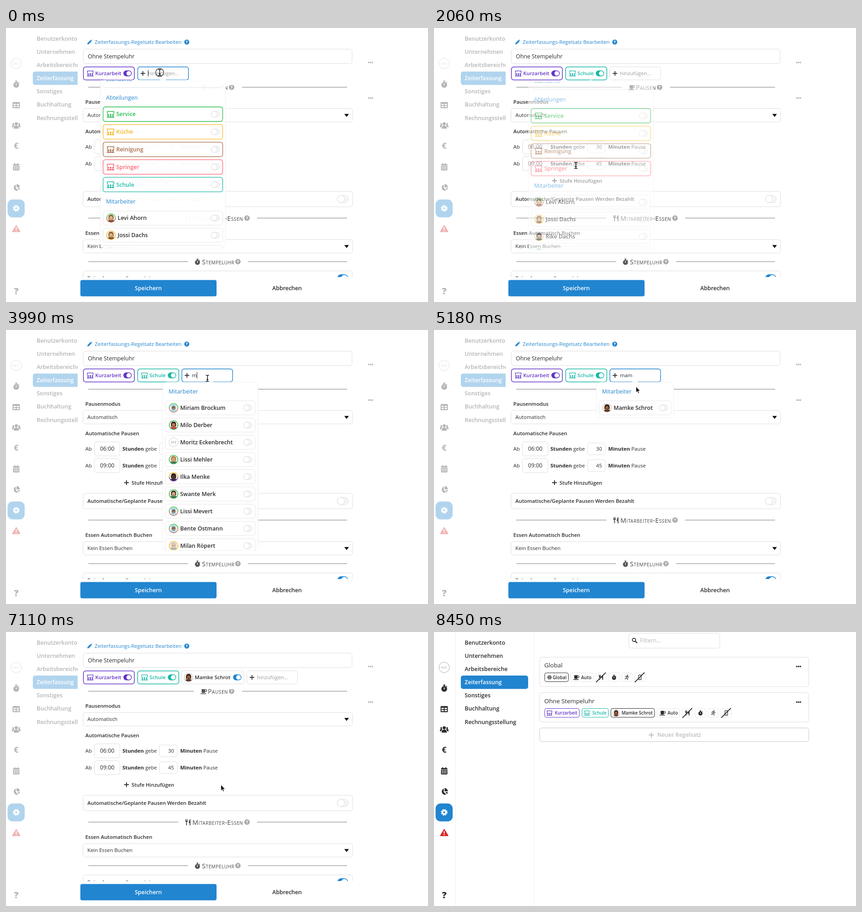
These frames come from a looping animation (928 px wide and 604 px high, 8.91 s). An HTML page:

```html
<!DOCTYPE html>
<html lang="de">
<head>
<meta charset="utf-8">
<title>Zeiterfassung</title>
<style>
html, body { margin: 0; width: 100%; height: 100%; overflow: hidden; background: #fff; }
svg { display: block; width: 100vw; height: 100vh; font-family: "Open Sans", "Noto Sans", sans-serif; }
text { white-space: pre; }
.sc { font-variant: small-caps; letter-spacing: .6px; }
</style>
</head>
<body>
<svg id="stage" viewBox="0 0 928 604"></svg>
<script>
const INK = '#2b2b2b', BLUE = '#2185d0', PURPLE = '#6435c9', TEAL = '#17b8a6', RED = '#db2828';
const LINE = '#dedede', GREEN = '#21ba45', YELLOW = '#f7b924', BROWN = '#a5673f', PINK = '#fb5f6b';

// ---- drawing helpers: y is always the vertical centre of a text ----
const text = (x, y, s, size = 11.3, weight = 400, fill = INK, more = '') =>
  `<text x="${x}" y="${y + size * .36}" font-size="${size}" font-weight="${weight}" fill="${fill}" ${more}>${s}</text>`;
const mid = 'text-anchor="middle"';
const rect = (x, y, w, h, fill, r = 0, stroke = 'none', sw = 1, more = '') =>
  `<rect x="${x}" y="${y}" width="${w}" height="${h}" rx="${r}" fill="${fill}" stroke="${stroke}" stroke-width="${sw}" ${more}/>`;
const box = (x, y, w, h, stroke = LINE, sw = 1, r = 5) => rect(x, y, w, h, '#fff', r, stroke, sw);
const circle = (x, y, r, fill, more = '') => `<circle cx="${x}" cy="${y}" r="${r}" fill="${fill}" ${more}/>`;
const path = (d, more = '') => `<path d="${d}" ${more}/>`;
const line = (d, w, more = '') => path(d, `fill="none" stroke="currentColor" stroke-width="${w}" ${more}`);
const group = (id, inner, more = '') => `<g id="${id}" ${more}>${inner}</g>`;

// ---- icons in a box from -8 to 8 ----
const people = (x, s = 1, y = 0) => circle(x, y - 3.2 * s, 2.1 * s, 'currentColor') +
  path(`M${x - 3.4 * s} ${y + 4 * s}q0-4.4 ${3.4 * s}-4.4t${3.4 * s} 4.4z`);
const windows = (xs, ys, w, h) => xs.flatMap(x => ys.map(y => rect(x, y, w, h, '#fff'))).join('');
const ICONS = {
  team: line('M-6.8-.8V-6H6.8V-.8', 1.5) + [-5.2, 0, 5.2].map(x => circle(x, 1.6, 1.9, 'currentColor') +
    path(`M${x - 2.5} 7.2q0-3.2 2.5-3.2t2.5 3.2z`)).join(''),
  watch: circle(0, 1.4, 6.3, 'currentColor') + rect(-2.4, -8, 4.8, 2, 'currentColor', .6) +
    rect(-1, -7, 2, 3, 'currentColor') + line('M4.4-4.5L6-3', 2) + rect(-.9, -2, 1.8, 4.6, '#fff', .9),
  table: rect(-8, -6.8, 16, 13.6, 'currentColor', 1.6) + windows([-6, 1], [-3, 1.6], 5, 2.9),
  users: people(-5.4, .8, .3) + people(5.4, .8, .3) + circle(0, -2.4, 3.6, '#fff') +
    path('M-5.4 6.5q0-6.5 5.4-6.5t5.4 6.5z', 'stroke="#fff"') + circle(0, -2.8, 2.8, 'currentColor'),
  calendar: rect(-7, -6, 14, 14, 'currentColor', 1.6) + rect(-4.4, -8, 2, 3, 'currentColor') + rect(2.4, -8, 2, 3, 'currentColor') +
    rect(-7, -3, 14, 1, '#fff') + windows([-4.8, -1.1, 2.6], [-.2, 3.4], 2.2, 2.2),
  pie: path('M-1-6.8V.8L4.4 6.2A7 7 0 1 1-1-6.8z') + path('M.8-8A7.4 7.4 0 0 1 8-.8H.8z') + path('M2 .9H8A7.4 7.4 0 0 1 6 5z'),
  cog: circle(0, 0, 4.1, 'none', 'stroke="currentColor" stroke-width="3.6"') +
    circle(0, 0, 6.4, 'none', 'stroke="currentColor" stroke-width="2.8" stroke-dasharray="3 2.027"'),
  warn: path('M0-6.5L7.5 6H-7.5z', 'stroke="currentColor" stroke-width="2" stroke-linejoin="round"') +
    rect(-1, -3.4, 2, 5, '#fff', .6) + circle(0, 4, 1.2, '#fff'),
  cup: path('M-5-6H4V1.5Q4 4 1.5 4H-2.5Q-5 4-5 1.5z') + line('M4-4.6H5.5a2.5 2.5 0 0 1 0 5H4', 1.5) + rect(-8, 5, 15, 1.9, 'currentColor', 1),
  fork: line('M-4 0V7.5', 2.2) + path('M-7-8h1.3v4h1V-8h1.4v4h1V-8h1.3V-2.5Q-1 0-4 0T-7-2.5z') +
    path('M6-8V7.8H3.6V2H1.4Q1.6-6.5 6-8z'),
  runner: circle(2, -6.3, 1.7, 'currentColor') +
    line('M-5-1.5L-3-3.8H1L-1.4 1 2 3V7.5M-1.6 1.5L-3 4H-6.5M1-3.4L3-.8H6', 1.7, 'stroke-linejoin="round" stroke-linecap="round"'),
  phone: rect(-4.2, -7, 8.4, 14, 'none', 1.5, 'currentColor', 1.7) + circle(0, 4.6, 1, 'currentColor'),
  slash: line('M-9 9L9-9', 1.7, 'stroke-linecap="round"'),
  globe: circle(0, 0, 7.6, 'currentColor') + path('M-8-2.5H8M-8 2.5H8M0-8V8', 'stroke="#fff" stroke-width=".9"') +
    '<ellipse rx="3.4" ry="7.6" fill="none" stroke="#fff" stroke-width=".9"/>',
  house: rect(-6, -8, 12, 16, 'currentColor', 1) + windows([-3.4, 1], [-5.5, -2, 1.5], 2.4, 2) + rect(-1.2, 5, 2.4, 3, '#fff'),
  pencil: path('M-8 8L-7 3 2.5-6.5 6.5-2.5-3 7z') + path('M3.6-7.4L5-8.2Q8.6-6.5 8-4.4L7.4-3.6z'),
  help: circle(0, 0, 8, 'currentColor') + text(0, 0, '?', 12.5, 800, '#fff', mid),
  plus: line('M0-7V7M-7 0H7', 2.8, 'stroke-linecap="round"'),
  search: circle(-1.5, -1.5, 4.8, 'none', 'stroke="currentColor" stroke-width="2.4"') + line('M2 2L7 7', 2.8, 'stroke-linecap="round"')
};
const icon = (name, x, y, size, color = INK) =>
  `<g transform="translate(${x} ${y}) scale(${size / 16})" color="${color}" fill="currentColor">${ICONS[name]}</g>`;

const toggle = (x, y, color, h = 13, w = 18.5) => color
  ? rect(x - w / 2, y - h / 2, w, h, color, h / 2) + circle(x + w / 2 - h / 2, y, h / 2 - 1.4, '#fff')
  : rect(x - w / 2, y - h / 2, w, h, '#f7f7f7', h / 2, '#dcdcdc') + circle(x - w / 2 + h / 2, y, h / 2, '#fff', 'stroke="#dcdcdc"');

// look: ring colours, hair, skin, shirt
const avatar = (x, y, look, r = 10) => {
  const [a, b, hair, skin, shirt] = look.split(' ');
  return `<g transform="translate(${x} ${y}) scale(${r / 10})">` + circle(0, 0, 9.6, '#f6f1ea', `stroke="${a}" stroke-width="1.2"`) +
    circle(0, 0, 9.6, 'none', `stroke="${b}" stroke-width="1.2" stroke-dasharray="30"`) +
    path('M-7 6Q-4 3 0 3T7 6Q4 9 0 9T-7 6z', `fill="${shirt}"`) + path('M-5.6 3V-2Q-5-7.4 0-7.4T5.6-2V3z', `fill="${hair}"`) +
    rect(-3.6, -4, 7.2, 8.6, skin, 3.4) + circle(-1.6, -.6, .6, '#333') + circle(1.6, -.6, .6, '#333') +
    path('M-2 2Q0 3.6 2 2', `fill="none" stroke="${hair}" stroke-width="1.1"`) + '</g>';
};
const LOOK = {
  beard: '#21ba45 #fb5f6b #8a5a2b #efc39a #7a4a32', gold: '#f7b924 #f7b924 #8a5a2b #efc39a #7a4a32',
  dark: '#c9c9c9 #f7b924 #2a2320 #d9a679 #3b3b3b', blue: '#21ba45 #fb5f6b #9fd4ea #9a6440 #a8dcef',
  lady: '#21ba45 #21ba45 #33211a #c98a5c #c94040', wood: '#21ba45 #21ba45 #b07a45 #e0b083 #56705c',
  afro: '#f7b924 #6435c9 #2a1a18 #5a382b #3d2a4a', brown: '#21ba45 #21ba45 #4b3325 #e5b68f #4f6f50',
  grey: '#f7b924 #f7b924 #cfcac2 #eec49c #a9b8c2', cap: '#cfcfcf #cfcfcf #2c1c17 #a8653f #5b3424'
};

const teamChip = (x, w, name, color) => box(x, 85.75, w, 28.7, color, 1.5) +
  icon('team', x + 15, 100, 14.5, color) + text(x + 26, 100, name, 11.3, 600, color) + toggle(x + w - 15, 100, color);

// ---- page behind the dialog ----
const NEW = 'Mamke Schrot';
const smallBox = (x, y, w, color = '#e6e6e6') => box(x, y - 10, w, 19.5, color, 1, 4);
const label = (x, y, w, name, color) => smallBox(x, y, w, color) + text(x + w - 4, y, name, 9.9, 600, color, 'text-anchor="end"');
const badges = (x, y) => smallBox(x, y, 50) + icon('cup', x + 12, y, 13) + text(x + 23, y, 'Auto', 9.9, 600) +
  ['fork', 'watch', 'runner', 'phone'].map((n, i) => {
    const bx = x + 55.5 + i * 28.4;
    return smallBox(bx, y, 23) + icon(n, bx + 11.5, y, 11.5) + (i % 3 ? '' : icon('slash', bx + 11, y, 18));
  }).join('');
const dots = y => [797.7, 801.7, 805.7].map(x => circle(x, y, 1.7, INK)).join('');

function page() {
  const menu = ['Benutzerkonto', 'Unternehmen', 'Arbeitsbereiche', 'Zeiterfassung', 'Sonstiges', 'Buchhaltung', 'Rechnungsstellung'];
  return group('outlines', path('M47.5 0V604M219.5 0V604', 'stroke="#eee"') + box(428.5, 3, 200, 32.5) +
      box(232.5, 55.5, 591.5, 65) + box(232.5, 133.5, 591.5, 65) + box(232.5, 211.5, 591.5, 30, '#c6c6c6')) +
    circle(22.5, 78, 11.5, '#fff', 'stroke="#aaa"') + text(22.5, 78, 'ME', 8, 400, '#aaa', mid + ' letter-spacing=".8"') +
    icon('watch', 22.5, 124, 16) + icon('table', 22.5, 170, 16) + icon('users', 22.5, 214.5, 19) +
    text(22.5, 260, '€', 18, 700, INK, mid) + icon('calendar', 22.5, 306, 16) + icon('pie', 22.5, 352, 16) +
    rect(3.5, 378, 37.5, 39.5, BLUE, 11) + icon('cog', 22.5, 397.5, 15, '#fff') + icon('warn', 22.5, 442.5, 17, RED) +
    text(22.5, 580, '?', 20, 800, INK, mid) +
    rect(59, 96, 148, 29.5, BLUE, 5) +
    menu.map((s, i) => text(67.5, 23.5 + i * 29.1, s, 12.4, 600, i == 3 ? '#fff' : INK)).join('') +
    icon('search', 441, 18.5, 12) + text(453, 19, 'Filtern...', 12.3, 400, '#b5b5b5') +
    text(242.5, 73, 'Global', 13.35) + dots(76) +
    label(243.5, 100, 52, 'Global', INK) + icon('globe', 254, 100, 10) + badges(300.5, 100) +
    text(242.5, 152, 'Ohne Stempeluhr', 13.35) + dots(154.5) +
    label(243.5, 178.5, 76, 'Kurzarbeit', PURPLE) + icon('team', 254, 178.5, 12.5, PURPLE) +
    label(325.5, 178.5, 58, 'Schule', TEAL) + icon('team', 336.5, 178.5, 12.5, TEAL) +
    label(389, 178.5, 96, NEW, INK) + avatar(400.5, 178.5, LOOK.cap, 8) + badges(490.5, 178.5) +
    icon('plus', 478, 227, 11, '#bdbdbd') + text(491, 227, 'Neuer Regelsatz', 12.3, 600, '#bdbdbd');
}

// ---- dialog ----
const heading = (y, l, r, name, ix, tx, hx, s) =>
  path(`M181 ${y - .5}H${l}M${r} ${y - .5}H750`, 'stroke="#777"') + icon(name, ix, y, 14, '#555') +
  text(tx, y, s, 14, 400, '#444', 'class="sc"') + icon('help', hx, y - .5, 12, '#aaa');
const select = (y, s) => box(169.5, y - 14.5, 592.5, 29.5) + text(179, y, s) + path(`M744 ${y - 2.5}h10l-5 6.5z`);
const breakRow = (y, from, pause) => text(174.5, y, 'Ab') + box(194.5, y - 15.5, 56, 31) + text(222.5, y, from, 12.4, 400, INK, mid) +
  text(256, y, 'Stunden <tspan font-weight="400">gebe</tspan>', 11.3, 700) + box(337.5, y - 13, 39, 26) +
  text(369.5, y, pause, 11.3, 400, INK, 'text-anchor="end"') + text(383, y, 'Minuten <tspan font-weight="400">Pause</tspan>', 11.3, 700);

function dialog() {
  const body = heading(131, 413, 519, 'cup', 434.5, 444, 496, 'Pausen') +
    text(174.5, 163, 'Pausenmodus', 11.3, 600) + select(192, 'Automatisch') +
    text(174.5, 227.5, 'Automatische Pausen', 11.3, 600) + breakRow(262, '06:00', 30) + breakRow(299, '09:00', 45) +
    icon('plus', 265, 336.5, 10.5) + text(276, 336.5, 'Stufe Hinzufügen', 11.3, 600) +
    box(169.5, 360, 592.5, 34) + text(179, 377, 'Automatische/Geplante Pausen Werden Bezahlt', 11.3, 600) + toggle(740.5, 377, '', 16, 24) +
    heading(419.5, 379, 552, 'fork', 400.5, 410, 530, 'Mitarbeiter-Essen') +
    text(174.5, 452, 'Essen Automatisch Buchen', 11.3, 600) + select(481, 'Kein Essen Buchen') +
    heading(515.5, 400, 532, 'watch', 421, 431, 510, 'Stempeluhr') +
    box(169.5, 535.5, 592.5, 34) + text(179, 551.5, 'Zeiterfassungs-Stempeluhr', 11.3, 600) + toggle(740.5, 551.5, BLUE, 17, 24);
  return group('edge', rect(157, 5, 618, 595, '#fff', 12, '#f0f0f0'), 'style="filter:drop-shadow(0 0 5px rgba(0,0,0,.1))"') +
    rect(157.5, 5, 617, 595, '#fff', 12) +
    icon('pencil', 184, 31, 10.5, BLUE) + text(195, 31, 'Zeiterfassungs-Regelsatz Bearbeiten', 11.3, 400, BLUE) + icon('help', 397.5, 31, 11, BLUE) +
    box(170, 46.5, 591, 32) + text(180, 62.5, 'Ohne Stempeluhr', 12.4) +
    `<g clip-path="url(#bodyClip)">${body}</g>` +
    rect(163.5, 555.5, 299.5, 36, BLUE, 4) + text(313, 574, 'Speichern', 12.4, 600, '#fff', mid) + text(618, 574, 'Abbrechen', 12.4, 600, INK, mid) +
    teamChip(170.3, 112, 'Kurzarbeit', PURPLE) + group('school', teamChip(289.5, 90.5, 'Schule', TEAL)) +
    group('person', box(386, 85.5, 137.5, 29) + avatar(401.5, 100, LOOK.cap) + text(415, 100, NEW, 11.3, 600) + toggle(508.5, 100, BLUE)) +
    group('adder', rect(.7, 85.7, 111.6, 28.7, '#fff', 5, LINE, 1, 'id="frame"') + icon('plus', 12, 100, 10) +
      '<text id="typed" x="23" y="104" font-size="11.3"></text>' + path('M0 92.5V107', 'id="caret" stroke="#222"'));
}

// ---- popups, drawn around x = 0 ----
const shell = (w, bottom, rows) => path('M-8 116L0 108L8 116z', 'fill="#fff"') +
  rect(-w / 2, 115, w, bottom - 115, '#fff', 8, '#efefef') + `<g clip-path="url(#popClip)">${rows}</g>`;
const head = (w, y, s) => text(-w / 2 + 12.5, y, s, 12.4, 400, BLUE);
const dept = (y, s, color, id) => box(-131.5, y - 16, 263, 32, color, 1.3) + icon('team', -115, y, 16.5, color) +
  text(-102.5, y, s, 12.4, 600, color) + toggle(115.5, y, '') + (id ? group(id, toggle(115.5, y, color)) : '');
const plain = (y, name, s) => box(-131.5, y - 15.5, 263, 31, '#e6e6e6') + icon(name, -115.5, y, 12.5, '#444') +
  text(-103.5, y, s, 12.4, 600) + toggle(115.5, y, '');
const staff = (w, y, s, look, on = '', id = '') => box(-w / 2 + 6, y - 15.5, w - 12, 31, '#e6e6e6') +
  (look ? avatar(-w / 2 + 23.5, y, LOOK[look]) : circle(-w / 2 + 23.5, y, 10, '#fff', 'stroke="#ccc"') +
    text(-w / 2 + 24, y, 'ME', 7.5, 400, '#999', mid + ' letter-spacing=".8"')) +
  text(-w / 2 + 38, y, s, 12.4, 600) + toggle(w / 2 - 22.5, y, on) + (id ? group(id, toggle(w / 2 - 22.5, y, BLUE)) : '');

function fullList(scroll, withSchool) {
  const W = 275, top = 249 - scroll;
  const depts = [['Service', GREEN], ['Küche', YELLOW], ['Reinigung', BROWN], ['Springer', PINK]];
  if (withSchool) depts.push(['Schule', TEAL, 'schoolOn']);
  const end = top + 34.9 + depts.length * 38.8;
  let out = plain(137 - scroll, 'globe', 'Als globale Einstellung verwenden') + plain(211 - scroll, 'house', 'Silberne Wachtel');
  if (scroll) out += rect(-137, 100, 274, 26, '#fff');
  out += head(W, Math.max(175 - scroll, 113), 'Standorte') + head(W, top, 'Abteilungen') +
    depts.map(([s, c, id], i) => dept(top + 36 + i * 38.8, s, c, id)).join('') + head(W, end, 'Mitarbeiter') +
    staff(W, end + 36, 'Levi Ahorn', 'beard', scroll ? '' : BLUE) + staff(W, end + 73.8, 'Jossi Dachs', 'gold') +
    staff(W, end + 111.6, 'Rike Dachs', 'dark') + staff(W, end + 149.4, 'Bo Eilers', 'wood');
  return shell(W, 485, out);
}
function searchList() {
  const found = [['Miriam Brockum', 'blue'], ['Milo Derber', 'lady'], ['Moritz Eckenbrecht', ''], ['Lissi Mehler', 'wood'], ['Ilka Menke', 'afro'],
    ['Swante Merk', 'brown'], ['Lissi Mevert', 'blue'], ['Bente Ostmann', 'blue'], ['Milan Röpert', 'grey']];
  return shell(209, 486, head(209, 135.5, 'Mitarbeiter') + found.map(([s, l], i) => staff(209, 171.5 + i * 38, s, l)).join(''));
}
const singleList = () => shell(170, 193, head(170, 135.5, 'Mitarbeiter') + staff(170, 171.5, NEW, 'cap', '', 'personOn'));

const cursor = circle(0, 0, 8.8, 'none', 'id="press" stroke="#222" stroke-width="1.2"') +
  group('beam', path('M-3.5-7Q0-7 0-5Q0-7 3.5-7M0-5.5V5.5M-3.5 7Q0 7 0 5Q0 7 3.5 7M-2 2.5H2', 'fill="none" stroke="#111" stroke-width="1.4"')) +
  path('M0 0V13.2L3 10.4 5 15 7.2 14 5.2 9.6H9.4z', 'id="arrow" fill="#111" stroke="#fff" stroke-width=".9"');

document.getElementById('stage').innerHTML =
  '<defs><clipPath id="bodyClip"><path d="M157 126H775V549H157z"/></clipPath><clipPath id="popClip"><path d="M-150 115H150V485H-150z"/></clipPath></defs>' +
  page() + rect(0, 0, 928, 604, '#fff', 0, 'none', 0, 'id="veil"') + group('dialog', dialog()) +
  rect(4, 2, 779, 602, '#000', 0, 'none', 0, 'id="shade"') +
  group('listA', fullList(95, true)) + group('listB', fullList(95, false)) + group('listC', searchList()) +
  group('listD', singleList()) + group('listE', fullList(0, false)) + group('cursor', cursor);

// ---- timing ----
const LOOP = 8910;
const SPANS = [[140, 140, 1], [440, 1470, 8], [1620, 2660, 8], [2800, 3550, 6], [3990, 4290, 3], [4740, 4740, 1],
  [5030, 5930, 7], [6080, 6220, 2], [6670, 7700, 8], [7850, 8450, 5]];
// even steps, cut to whole hundredths of a second
const TICKS = [0, ...SPANS.flatMap(([a, b, n]) =>
  Array.from({ length: n }, (_, i) => n > 1 ? Math.floor((a + (b - a) * i / (n - 1)) / 10) * 10 : a))];
const PATH = [[300, 338, 98], [1320, 312, 345], [1900, 312, 345], [2060, 312, 303], [2660, 443, 105], [3550, 443, 106.5], [4900, 443, 106.5],
  [5700, 447, 171], [6400, 447, 171], [7050, 475, 330], [7650, 386, 572]];
const PRESS = [[0, 140], [1470, 1620], [2950, 3250], [5780, 6080], [7700, 7850]];
// popup: id, centre, then [from, opacity, drop]
const POPUPS = [
  ['listA', 345, [[0, .97, 0], [140, 1, 0], [1760, 0, 0]]],
  ['listB', 345, [[0, 0, 0], [1760, .95, 0], [1910, .8, 1.5], [2060, .55, 3.5], [2210, 0, 5]]],
  ['listB', 442.5, [[2800, 0, 8], [2950, .1, 7], [3100, .35, 5], [3250, .8, 1.5], [3400, 1, 0], [3990, 0, 0]]],
  ['listC', 449.5, [[0, 0, 0], [3990, 1, 0], [4140, 0, 0]]],
  ['listD', 442, [[0, 0, 0], [4140, 1, 0], [6080, 0, 0]]],
  ['listE', 498.5, [[0, 0, 0], [6080, .4, 5], [6220, 0, 5]]]
];
// from, dialog opacity, scale, veil, shade
const CLOSE = [[0, 1, 1, .65, 0], [7850, 1, .998, .65, .02], [8000, .7, .97, .5, .015], [8150, .3, .93, .25, .007], [8300, 0, .9, .06, 0], [8450, 0, .9, 0, 0]];
const TYPED = [[0, 'hinzufügen...'], [3990, 'm'], [4140, 'ma'], [4290, 'mam'], [6080, 'hinzufügen...']];

const at = (table, t) => table.filter(k => k[0] <= t).pop();
const within = (t, a, b) => t >= a && t < b;
const el = {};
document.querySelectorAll('svg [id]').forEach(n => el[n.id] = n);
const set = (id, attrs) => { for (const k in attrs) el[id].setAttribute(k, attrs[k]); };
const show = (id, on) => set(id, { opacity: +!!on });

function pointAt(t) {
  const i = PATH.findIndex(k => k[0] > t);
  if (i < 1) return (i ? PATH[PATH.length - 1] : PATH[0]).slice(1);
  const a = PATH[i - 1], b = PATH[i], p = (t - a[0]) / (b[0] - a[0]), e = p * p * (3 - 2 * p);
  return [a[1] + (b[1] - a[1]) * e, a[2] + (b[2] - a[2]) * e];
}

function draw(t) {
  for (const [id, x, keys] of POPUPS) {
    const k = at(keys, t);
    if (k) set(id, { opacity: k[1], transform: `translate(${x} ${k[2]})` });
  }
  show('schoolOn', t >= 1470);
  show('personOn', t >= 5930);
  show('school', t >= 1760);
  show('person', t >= 6080);

  const focus = t < 1760 || within(t, 2950, 6080), word = at(TYPED, t)[1], empty = word.length > 3;
  set('adder', { transform: `translate(${t < 1760 ? 289 : t < 6080 ? 386 : 529} 0)` });
  set('frame', { stroke: focus ? BLUE : LINE, 'stroke-width': focus ? 1.4 : 1 });
  if (el.typed.textContent !== word) el.typed.textContent = word;
  set('typed', { fill: empty ? '#999' : INK });
  const since = [0, 2950, 3990, 4290].filter(k => k <= t).pop();
  show('caret', focus && (t - since) % 1000 < 450);
  set('caret', { transform: `translate(${23.5 + (empty ? 0 : el.typed.getComputedTextLength())} 0)` });

  const [, op, scale, veil, shade] = at(CLOSE, t);
  set('dialog', { opacity: op, transform: `translate(466 302) scale(${scale}) translate(-466 -302)` });
  set('veil', { opacity: veil });
  set('shade', { opacity: shade });
  show('edge', t >= 7850);
  show('outlines', t >= 8000);

  const [x, y] = pointAt(t), arrow = within(t, 730, 2000) || t > 5170;
  set('cursor', { transform: `translate(${x} ${y})`, opacity: t < 8300 ? 1 : 0 });
  show('arrow', arrow);
  show('beam', !arrow);
  show('press', PRESS.some(([a, b]) => within(t, a, b)));
}

const start = performance.now();
let last = -1;
function loop(now) {
  const t = Math.max(0, now - start) % LOOP, tick = TICKS.filter(k => k <= t).pop();
  if (tick !== last) draw(last = tick);
  requestAnimationFrame(loop);
}
draw(0);
requestAnimationFrame(loop);
</script>
</body>
</html>
```
